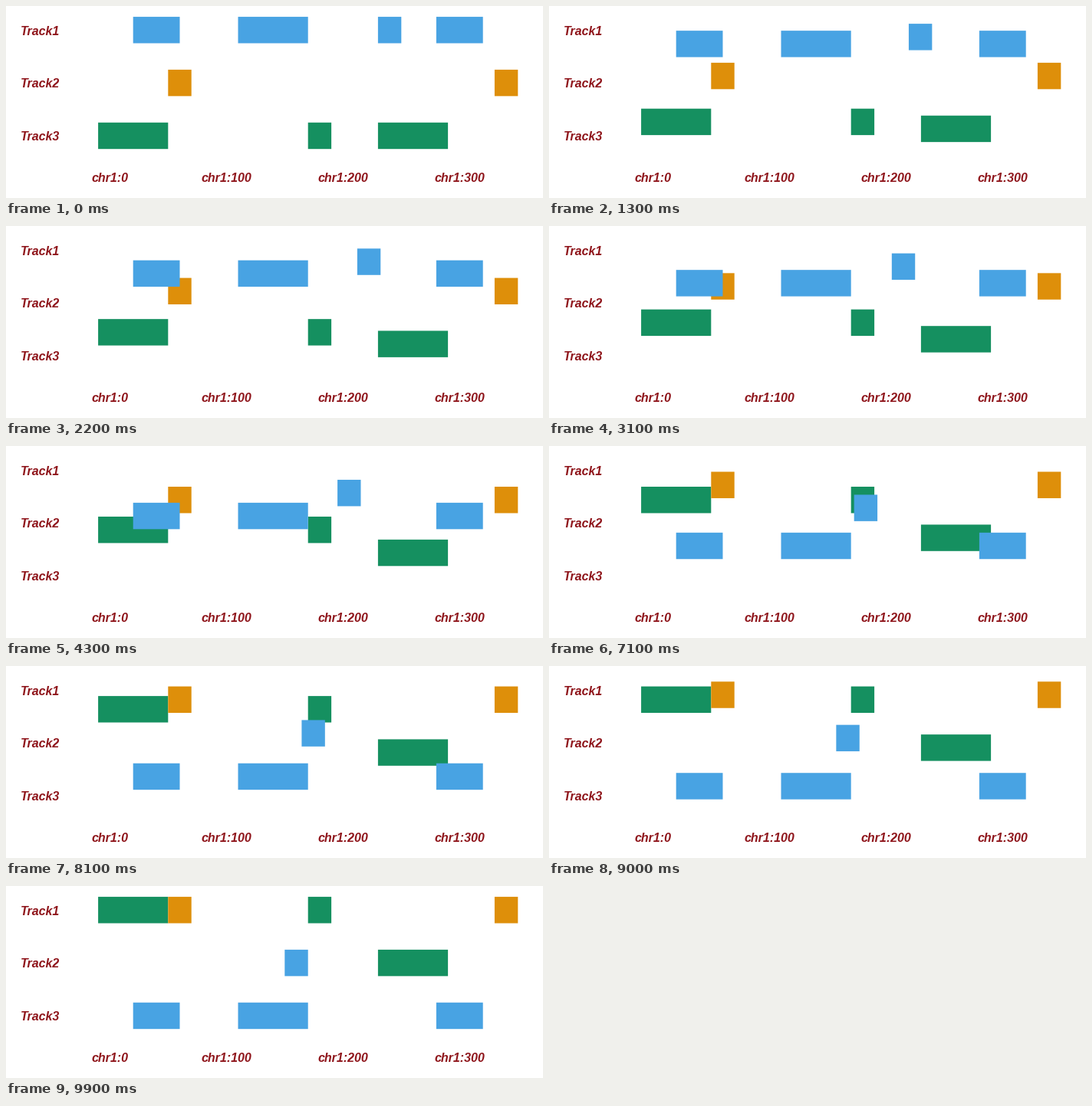
Recreate the animation shown at these times as a matplotlib script. Size 700x250 px, loop 10000 ms.

```python
import matplotlib.pyplot as plt
from matplotlib.animation import FuncAnimation
from matplotlib.patches import Rectangle

W, H, DPI = 700, 250, 100
FRAMES = 100
X0, UNIT = 120.1, 1.52          # pixel of position 0, pixels per base
TOP, PITCH = 14.07, 68.84       # first track's top, distance between tracks
BLUE, ORANGE, GREEN, INK = "#48a3e3", "#de8f0a", "#159060", "#8f151b"

# colour, width, start position, end position, first track, last track
RANGES = [
    (GREEN, 60, 0, 0, 2, 0),
    (GREEN, 20, 180, 180, 2, 0),
    (GREEN, 60, 240, 240, 2, 1),
    (ORANGE, 20, 60, 60, 1, 0),
    (ORANGE, 20, 340, 340, 1, 0),
    (BLUE, 40, 30, 30, 0, 2),
    (BLUE, 60, 120, 120, 0, 2),
    (BLUE, 20, 240, 160, 0, 1),
    (BLUE, 40, 290, 290, 0, 2),
]

fig = plt.figure(figsize=(W / DPI, H / DPI), dpi=DPI, facecolor="white")
ax = fig.add_axes([0, 0, 1, 1])
ax.set(xlim=(0, W), ylim=(H, 0))
ax.axis("off")


def label(x, y, text, align):
    ax.text(x, y, text, color=INK, ha=align, va="baseline",
            family="Liberation Sans", weight="bold", style="italic",
            size=16 * 72 / DPI)


for i in range(3):
    label(18.5, 37.6 + i * PITCH, f"Track{i + 1}", "left")
for i in range(4):
    label(X0 + (10 + 100 * i) * UNIT, 229, f"chr1:{100 * i}", "center")

boxes = [
    ax.add_patch(Rectangle((0, 0), width * UNIT, PITCH / 2, facecolor=color,
                           linewidth=0, snap=False))
    for color, width, *_ in RANGES
]


def mix(a, b, t):
    return a + (b - a) * t


def update(frame):
    t = frame / (FRAMES - 1)
    for box, (_, _, x1, x2, row1, row2) in zip(boxes, RANGES):
        box.set_xy((X0 + mix(x1, x2, t) * UNIT, TOP + mix(row1, row2, t) * PITCH))
    return boxes


anim = FuncAnimation(fig, update, frames=FRAMES, interval=100,
                     repeat=True, repeat_delay=0, blit=False)
plt.show()
```
